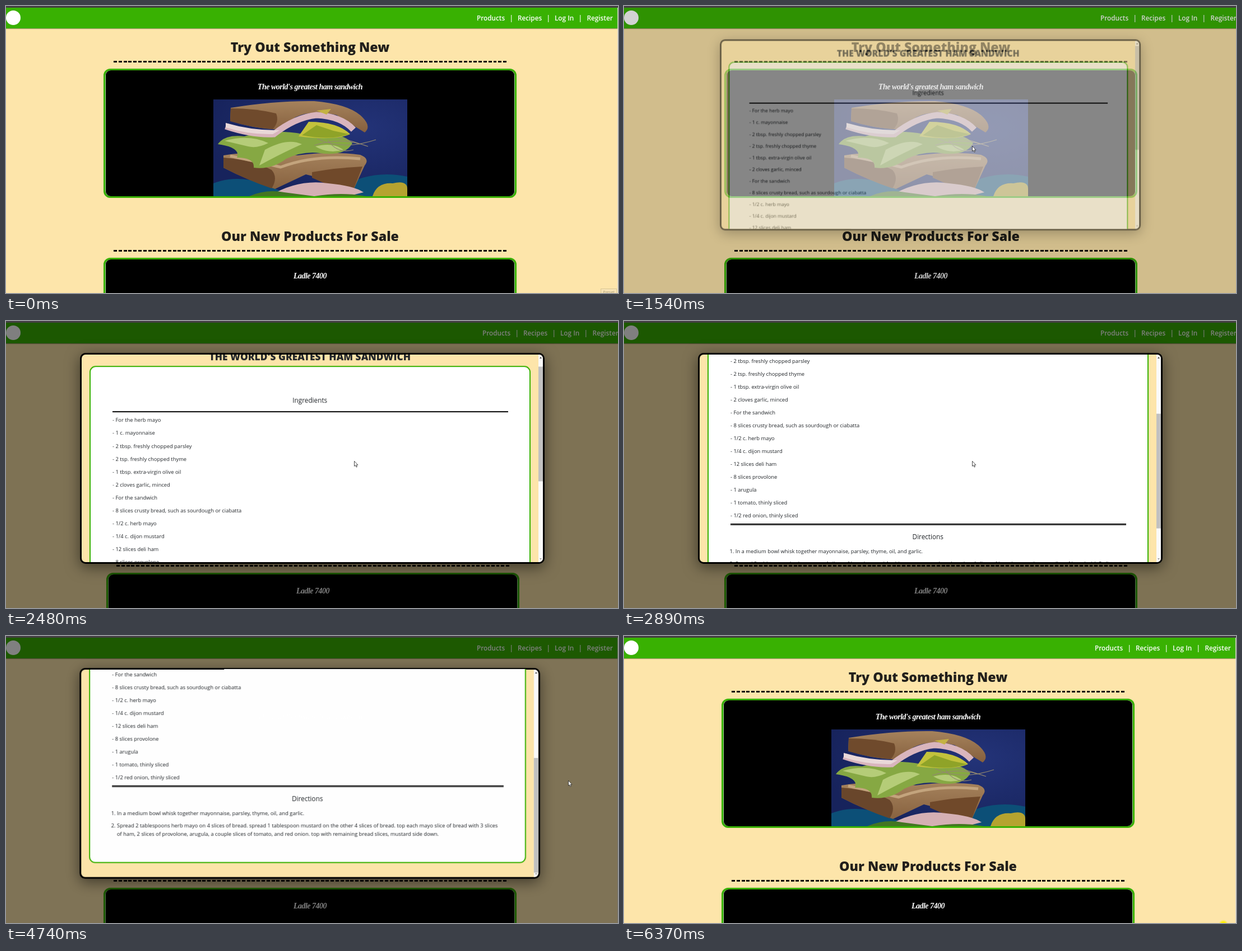
These frames come from a looping animation (1092x513 px, 6.44 s). An HTML page:

```html
<!DOCTYPE html>
<html lang="en">
<head>
<meta charset="utf-8">
<title>Recipes</title>
<style>
:root { --green: #39b102; --cream: #fde5aa; --loop: 6440ms; }
* { box-sizing: border-box; margin: 0; padding: 0; }
html, body { width: 100%; height: 100%; overflow: hidden; }
body { font-family: "Open Sans", sans-serif; color: #212529; }
.stage, .page, .backdrop { position: absolute; inset: 0; overflow: hidden; }
.stage { width: 1092px; height: 513px; background: var(--cream); }
.stage * { position: absolute; white-space: nowrap; }

/* Page */
.strip { left: 0; top: 0; width: 100%; height: 3px; background: #433f42; }
.bar { left: 0; top: 3px; width: 100%; height: 37px; background: var(--green); box-shadow: 0 1px 1px rgba(90, 80, 60, .5); }
.logo { left: 0; top: 8px; width: 26px; height: 26px; border-radius: 50%; background: #fff; }
nav { left: 0; top: 11px; line-height: 20px; font-size: 11.75px; font-weight: 600; color: #fff; animation: navShift var(--loop) step-end infinite; }
.track { left: 1091px; top: 3px; width: 1px; height: 510px; background: #e4e0d6; animation: track var(--loop) step-end infinite; }
.page { overflow: visible; animation: pageShift var(--loop) step-end infinite; }
h1 { left: 192px; width: 701px; text-align: center; line-height: 32px; font-size: 23.2px; font-weight: 800; color: #211f1b; }
.dash { left: 192px; width: 701px; height: 3px; background: repeating-linear-gradient(90deg, #000 0 5.9px, transparent 5.9px 8.8px); }
.box { left: 174px; width: 737px; height: 231px; border: 3px solid var(--green); border-radius: 12px; background: #000; overflow: hidden; box-shadow: inset 1px 0 #a5d795, inset -1px 0 #a5d795; }
.box p { left: 0; width: 100%; top: 20px; text-align: center; color: #fff; font: italic bold 14px/20px "Liberation Serif", serif; letter-spacing: -.5px; }
.photo { left: 192.5px; top: 52px; width: 346px; height: 173px; }

/* Dialog */
.backdrop { top: 3px; background: #000; opacity: 0; animation: dim var(--loop) linear infinite; }
.modal { left: 132px; top: 57px; width: 829px; height: 377px; border: 3px solid #000; border-radius: 10px; background: var(--cream); overflow: hidden; box-shadow: 0 6px 26px rgba(0, 0, 0, .5); transform-origin: 50% 27px; animation: modalFit var(--loop) step-end infinite, pop var(--loop) linear infinite; }
.view { left: 0; right: 8.5px; top: 0; bottom: 0; overflow: hidden; }
.sheet { left: 0; top: 0; width: 100%; height: 640px; animation: scroll var(--loop) ease-in-out infinite; }
h2, h3 { left: 0; width: 100%; line-height: 24px; text-align: center; }
h2 { top: 12px; font-size: 17.4px; font-weight: 800; }
h3 { font-size: 11.75px; font-weight: 500; }
.card { left: 14px; right: 14px; top: 41px; height: 573px; border: 2px solid var(--green); border-radius: 11px; background: #fff; }
.rule { left: 55px; right: 54px; }
.one { top: 122px; height: 1.6px; background: #000; }
.two { top: 475px; height: 3px; background: linear-gradient(#000 1px, #777 1px 2px, #000 2px); }
.sheet ul, .sheet ol { font-size: 9.4px; list-style: none; }
.sheet ul { left: 55px; top: 126.4px; line-height: 23.07px; }
.sheet ol { left: 53.5px; top: 518px; line-height: 14.1px; }
.sheet li { position: static; }
.sheet ol li { margin-bottom: 8.4px; padding-left: 10.2px; text-indent: -10.2px; }
.scroller { right: 0; top: 0; bottom: 0; width: 8.5px; background: #fafafa; }
.thumb { left: .5px; width: 7.5px; top: 10px; height: 205px; background: #c1c1c1; animation: thumb var(--loop) ease-in-out infinite; }
.up, .down { left: 2px; border: 2.3px solid transparent; }
.up { top: 2px; border-bottom: 3px solid #505050; }
.down { bottom: 2px; border-top: 3px solid #a3a3a3; }

/* Pointer */
.cursor { left: 0; top: 0; animation: move var(--loop) linear infinite; }
.cursor svg { left: 0; top: 0; overflow: visible; }
.arrow { animation: arrow var(--loop) step-end infinite; }
.hand { animation: hand var(--loop) step-end infinite; }
.tip { left: 1061px; top: 505px; width: 29px; height: 14px; border: 1px solid #d9c795; background: #f7e3b4; color: #a79a78; font-size: 7px; line-height: 12px; text-align: center; animation: tip var(--loop) step-end infinite; }
.glow { left: 1061px; top: 507px; width: 17px; height: 17px; border-radius: 50%; background: radial-gradient(#fff000 35%, rgba(255, 236, 40, 0) 70%); animation: glow var(--loop) linear infinite; }

@keyframes pageShift { 0%, 72.981%, 100% { transform: none; } 21.739% { transform: translateX(5px); } }
@keyframes navShift { 0%, 72.981%, 100% { transform: none; } 21.739% { transform: translateX(10px); } }
@keyframes track { 0%, 72.981%, 100% { opacity: 1; } 21.739% { opacity: 0; } }
@keyframes modalFit { 0% { left: 132px; width: 829px; } 72.981%, 100% { left: 131px; width: 822px; } }
@keyframes dim { 0%, 21.739% { opacity: 0; } 27.95%, 73.602% { opacity: .5; } 76.242%, 100% { opacity: 0; } }
@keyframes pop {
  0%, 22.14% { opacity: 0; transform: scale(.8); animation-timing-function: ease; }
  27.95% { opacity: 1; transform: none; }
  73.602% { opacity: 1; transform: none; animation-timing-function: ease; }
  77.55%, 100% { opacity: 0; transform: scale(.8); }
}
@keyframes scroll {
  0%, 36.5% { transform: none; }
  44.876%, 48.3% { transform: translateY(-173px); }
  53.416%, 100% { transform: translateY(-268px); }
}
@keyframes thumb {
  0%, 36.5% { transform: none; }
  44.876%, 48.3% { transform: translateY(95.7px); }
  53.416%, 100% { transform: translateY(148px); }
}
@keyframes move {
  0%, 7.45% { transform: translate(1079px, 516px); animation-timing-function: cubic-bezier(.4, 0, .4, 1); }
  17.702%, 58.696% { transform: translate(621px, 250px); }
  62.112% { transform: translate(690px, 340px); }
  64.441% { transform: translate(790px, 408px); }
  66.77% { transform: translate(900px, 330px); }
  69.099%, 69.9% { transform: translate(966px, 219px); }
  72.516% { transform: translate(1003px, 258px); }
  83.075% { transform: translate(1003px, 258px); animation-timing-function: ease-in-out; }
  93.634%, 100% { transform: translate(1066px, 516px); }
}
@keyframes arrow { 0%, 22.14%, 100% { opacity: 1; } 13.354% { opacity: 0; } }
@keyframes hand { 0%, 22.14%, 100% { opacity: 0; } 13.354% { opacity: 1; } }
@keyframes tip { 0% { opacity: 1; } 1.087%, 100% { opacity: 0; } }
@keyframes glow { 0%, 94% { opacity: 0; } 98.9%, 100% { opacity: 1; } }
</style>
</head>
<body>
<div class="stage">
  <div class="bar"></div>
  <div class="logo"></div>
  <nav>
    <span style="left:840px">Products</span><span style="left:898.5px">|</span>
    <span style="left:913px">Recipes</span><span style="left:964.5px">|</span>
    <span style="left:979px">Log In</span><span style="left:1021.5px">|</span>
    <span style="left:1036.5px">Register</span>
  </nav>

  <div class="page">
    <h1 style="top:57px">Try Out Something New</h1>
    <div class="dash" style="top:98px"></div>
    <div class="box" style="top:112px">
      <p>The world's greatest ham sandwich</p>
      <svg class="photo" viewBox="0 0 346 173">
        <defs>
          <radialGradient id="sky" cx=".75" cy=".3" r=".8">
            <stop offset="0" stop-color="#233378"/><stop offset="1" stop-color="#17235c"/>
          </radialGradient>
          <linearGradient id="crumb" x2="0" y2="1">
            <stop offset="0" stop-color="#a5825c"/><stop offset="1" stop-color="#855f3d"/>
          </linearGradient>
        </defs>
        <path fill="url(#sky)" d="M0 0H346V173H0Z"/>
        <path fill="#0c4f77" d="M0 150Q40 134 90 150L140 173H0ZM240 150Q290 126 346 138V173H240Z"/>
        <path fill="url(#crumb)" d="M18 100Q80 90 150 100Q210 92 262 99Q280 106 270 118L248 166Q200 142 165 134L110 160Q60 144 18 122Z"/>
        <path fill="#69462b" d="M18 104Q70 108 104 126Q116 140 104 159Q60 144 18 122Z"/>
        <path fill="none" stroke="#c3a47d" stroke-width="5" d="M30 101Q75 110 120 121Q180 98 262 106"/>
        <path fill="#70492a" d="M176 130Q220 122 266 120L248 166Q210 156 176 140Z"/>
        <path fill="#d5b0b4" d="M100 173Q150 142 205 150Q250 154 268 166L240 173Z"/>
        <path fill="#447522" d="M64 173Q95 160 126 166L180 173ZM180 173Q230 165 272 173Z"/>
        <path fill="#86a843" d="M8 80Q20 62 55 66Q105 52 160 62Q225 54 248 78Q236 102 190 96Q160 92 130 106Q104 126 72 122Q74 104 42 104Q50 86 8 80Z"/>
        <path fill="#b5cc78" d="M20 74Q64 62 98 78Q78 88 62 84ZM92 90Q132 68 158 80Q122 96 82 118ZM182 84Q214 76 232 90Q206 98 182 84Z"/>
        <path fill="none" stroke="#92886f" stroke-width="1.2" d="M185 70Q230 92 290 72M196 62Q236 70 276 84M180 82Q225 68 262 80M204 72Q220 98 250 90"/>
        <path fill="#c3c23c" d="M152 66L170 40Q222 40 244 62Q216 74 152 66Z"/>
        <path fill="#8fa328" d="M158 64L184 46L214 56L242 62Q210 74 158 64Z"/>
        <path fill="url(#crumb)" d="M31 15Q110 2 180 3Q238 8 262 28Q284 48 270 59Q242 42 220 28Q174 18 146 32L116 54Q70 52 30 38Z"/>
        <path fill="#6f4a2c" d="M31 16Q76 16 112 25Q118 40 106 53Q66 50 30 39Z"/>
        <path fill="none" stroke="#d9b5bd" stroke-width="11" d="M22 48Q70 64 108 62Q146 32 184 28Q228 30 250 54"/>
        <path fill="#e9d8d8" d="M22 42Q70 56 118 55L106 62Q62 63 22 50Z"/>
        <path fill="#c4b243" d="M184 20L210 17L202 27Z"/>
        <path fill="#b5a32f" d="M284 173Q292 148 320 150Q346 144 346 160V173Z"/>
      </svg>
    </div>
    <h1 style="top:395px">Our New Products For Sale</h1>
    <div class="dash" style="top:436px"></div>
    <div class="box" style="top:450px"><p>Ladle 7400</p></div>
  </div>
  <div class="track"></div>

  <div class="backdrop"></div>
  <div class="modal">
    <div class="view">
      <div class="sheet">
        <h2>THE WORLD'S GREATEST HAM SANDWICH</h2>
        <div class="card"></div>
        <h3 style="top:89.5px">Ingredients</h3>
        <div class="rule one"></div>
        <ul>
          <li>- For the herb mayo</li>
          <li>- 1 c. mayonnaise</li>
          <li>- 2 tbsp. freshly chopped parsley</li>
          <li>- 2 tsp. freshly chopped thyme</li>
          <li>- 1 tbsp. extra-virgin olive oil</li>
          <li>- 2 cloves garlic, minced</li>
          <li>- For the sandwich</li>
          <li>- 8 slices crusty bread, such as sourdough or ciabatta</li>
          <li>- 1/2 c. herb mayo</li>
          <li>- 1/4 c. dijon mustard</li>
          <li>- 12 slices deli ham</li>
          <li>- 8 slices provolone</li>
          <li>- 1 arugula</li>
          <li>- 1 tomato, thinly sliced</li>
          <li>- 1/2 red onion, thinly sliced</li>
        </ul>
        <div class="rule two"></div>
        <h3 style="top:486px">Directions</h3>
        <ol>
          <li>1. In a medium bowl whisk together mayonnaise, parsley, thyme, oil, and garlic.</li>
          <li>2. Spread 2 tablespoons herb mayo on 4 slices of bread. spread 1 tablespoon mustard on the other 4 slices of bread. top each mayo slice of bread with 3 slices<br>of ham, 2 slices of provolone, arugula, a couple slices of tomato, and red onion. top with remaining bread slices, mustard side down.</li>
        </ol>
      </div>
    </div>
    <div class="scroller">
      <div class="up"></div><div class="thumb"></div><div class="down"></div>
    </div>
  </div>

  <div class="strip"></div>
  <div class="tip">Preset</div>
  <div class="glow"></div>
  <div class="cursor">
    <svg class="arrow" width="8" height="12"><path d="M.5.5V9.6L2.5 7.8L4 11.2L5.5 10.5L4.1 7.3H6.9Z" fill="#fff" stroke="#222" stroke-width=".8"/></svg>
    <svg class="hand" width="10" height="13"><path d="M-1 1Q0-.4 1 1V5L5 6Q6.5 6.4 6.3 8L5.5 12H-.3L-3.5 7.8Q-3.4 6.2-1 7.7Z" fill="#fff" stroke="#222" stroke-width=".8"/></svg>
  </div>
</div>
</body>
</html>
```
